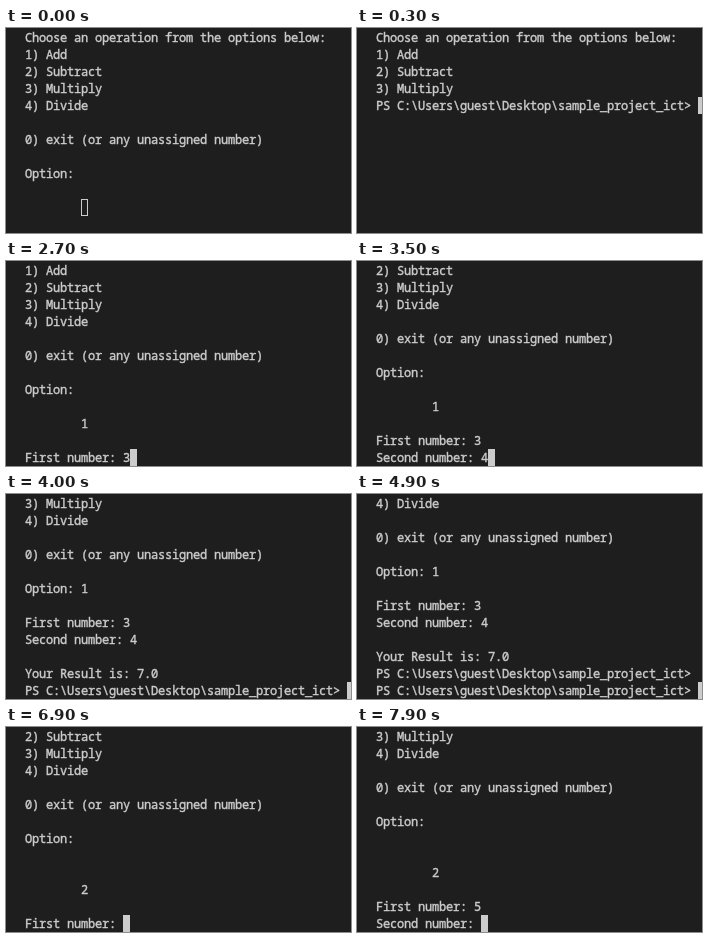
These frames come from a looping animation (345 by 205 pixels, 8000 ms). An HTML page with a canvas:

```html
<!DOCTYPE html>
<html lang="en">
<head>
<meta charset="utf-8">
<title>Calculator in a terminal</title>
<style>
  html, body { margin: 0; height: 100%; overflow: hidden; background: #1e1e1e; }
  canvas { display: block; }
</style>
</head>
<body>
<canvas id="screen" width="345" height="205"></canvas>
<script>
const ctx = document.getElementById('screen').getContext('2d');
const LOOP = 8000, ROWS = 12, LEFT = 19, TOP = 1, CELL_W = 7, CELL_H = 17;
const BACK = '#1e1e1e', INK = '#cccccc';

const choices = `Choose an operation from the options below:
1) Add
2) Subtract
3) Multiply
`;
const menu = choices + `4) Divide

0) exit (or any unassigned number)

Option:`;
const prompt = 'PS C:\\Users\\guest\\Desktop\\sample_project_ict> ';
const tab = ' '.repeat(8);
const askAdd = menu + '\n\n' + tab;
const askSubtract = menu + '\n\n\n' + tab;
const first = '\n\nFirst number: ';
const second = '\nSecond number: ';
const sum = first + '3' + second + '4\n\nYour Result is: 7.0\n' + prompt;
const done = menu + ' 1' + sum;

// Start time and terminal log
const steps = [
  [0, askAdd],
  [300, choices + prompt],
  [1200, askAdd + '1'],
  [1600, askAdd + '1' + first],
  [2700, askAdd + '1' + first + '3'],
  [2900, askAdd + '1' + first + '3' + second],
  [3500, askAdd + '1' + first + '3' + second + '4'],
  [3900, askAdd + '1' + sum],
  [4000, done],
  [4900, done + '\n' + prompt],
  [5500, askSubtract],
  [6600, askSubtract + '2'],
  [6900, askSubtract + '2' + first],
  [7600, askSubtract + '2' + first + '5'],
  [7900, askSubtract + '2' + first + '5' + second],
];

function drawChar(char, x, y) {
  ctx.fillText(char, x, y);
  ctx.strokeText(char, x, y); // thickens the strokes a little
}

function draw(log, focused) {
  ctx.fillStyle = BACK;
  ctx.fillRect(0, 0, 345, 205);
  ctx.fillStyle = ctx.strokeStyle = INK;
  ctx.font = '12px "Noto Sans Mono", "DejaVu Sans Mono", monospace';
  ctx.textAlign = 'center';
  ctx.lineWidth = 0.4;

  // The terminal keeps only the last rows in view
  const lines = log.split('\n').slice(-ROWS);
  lines.forEach((line, row) => [...line].forEach((char, col) =>
    drawChar(char, LEFT + (col + 0.5) * CELL_W, TOP + row * CELL_H + 13)));

  const x = LEFT + lines.at(-1).length * CELL_W;
  const y = TOP + (lines.length - 1) * CELL_H;
  ctx.lineWidth = 1;
  if (focused) ctx.fillRect(x, y, CELL_W, CELL_H);
  else ctx.strokeRect(x + 0.5, y + 0.5, CELL_W - 1, CELL_H - 1);
}

function tick() {
  const time = performance.now() % LOOP;
  const [start, log] = steps.findLast(([start]) => start <= time);
  draw(log, start > 0);
  requestAnimationFrame(tick);
}
tick();
</script>
</body>
</html>
```
